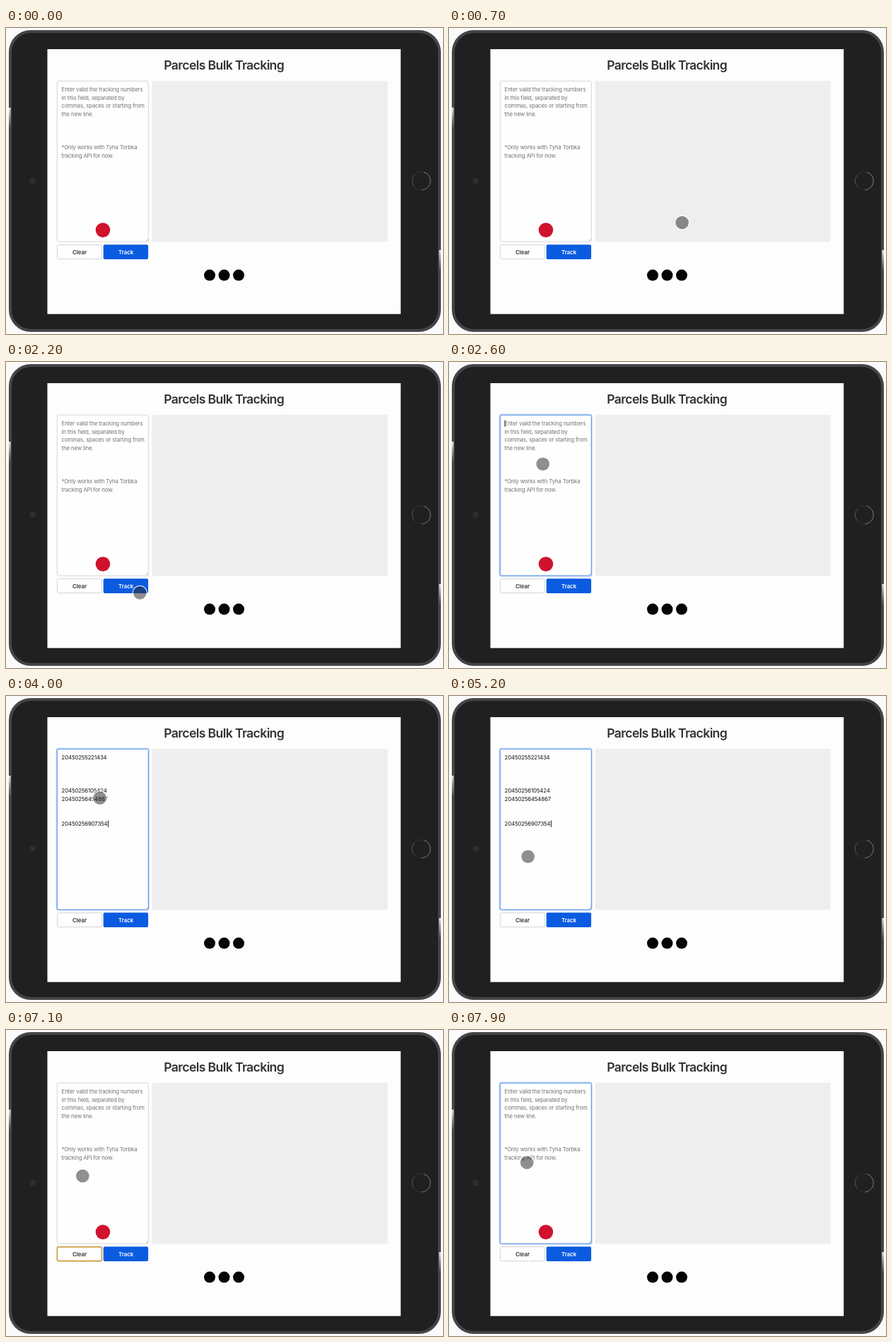
Animation of 618x434 px, one loop 8 s. Source, as an HTML page with a canvas:

```html
<!DOCTYPE html>
<html lang="en">
<head>
<meta charset="utf-8">
<title>Parcels Bulk Tracking</title>
<style>
  html, body { margin: 0; width: 100%; height: 100%; overflow: hidden; background: #fafafa; }
  canvas, svg { position: absolute; left: 0; top: 0; width: 618px; height: 434px; }
  text { font: 400 7.83px Inter, sans-serif; letter-spacing: -0.02em; }
  .title { font-size: 17.6px; font-weight: 600; letter-spacing: -0.035em; fill: #333; text-anchor: middle; }
  .button { font-weight: 600; text-anchor: middle; letter-spacing: 0; }
  #hint { fill: #747474; }
  #numbers { fill: #111; }
</style>
</head>
<body>
<canvas width="618" height="434"></canvas>
<svg viewBox="0 0 618 434">
  <text class="title" x="308.2" y="59.3">Parcels Bulk Tracking</text>
  <g id="hint"></g>
  <g id="numbers"></g>
  <text class="button" x="104" y="320.6" fill="#333">Clear</text>
  <text class="button" x="169.6" y="320.6" fill="#fff">Track</text>
  <rect id="caret" y="82.5" width="0.9" height="9.5" fill="#111"/>
  <g id="pointer">
    <circle r="9.9" fill="none" stroke="#fff" stroke-opacity=".85" stroke-width="1.3"/>
    <circle r="9.3" fill="rgb(40,40,40)" fill-opacity=".52"/>
  </g>
</svg>
<script>
const LOOP = 8000, STEP = 100;
const LINE = 11.75, FIRST = 89.9;
const FOCUS = 2600, PASTE = 4000, CLEAR = 6100, REFOCUS = 7400;

const canvas = document.querySelector('canvas');
const ctx = canvas.getContext('2d');
const scale = window.devicePixelRatio || 1;
canvas.width = 618 * scale;
canvas.height = 434 * scale;

const byId = id => document.getElementById(id);
const hint = byId('hint'), numbers = byId('numbers');
const caret = byId('caret'), pointer = byId('pointer');

// Each entry: line index, text
function addLines(group, lines) {
  for (const [row, words] of lines) {
    const el = document.createElementNS(group.namespaceURI, 'text');
    el.setAttribute('x', 78.6);
    el.setAttribute('y', FIRST + row * LINE);
    el.textContent = words;
    group.append(el);
  }
}
addLines(hint, [
  [0, 'Enter valid the tracking numbers'],
  [1, 'in this field, separated by'],
  [2, 'commas, spaces or starting from'],
  [3, 'the new line.'],
  [7, '*Only works with Tyha Torbka'],
  [8, 'tracking API for now.']
]);
addLines(numbers, [
  [0, '20450255221434'],
  [4, '20450256105424'],
  [5, '20450256454867'],
  [8, '20450256907354']
]);

// Pointer path: time, x, y
const path = [
  [100, 359, 394], [300, 350, 340], [500, 335, 292], [800, 327, 268],
  [1800, 327, 268], [2000, 268, 320], [2150, 214, 346], [2300, 140, 290],
  [2450, 94, 198], [2600, 132.7, 144.7],
  [4900, 132.7, 144.7], [5000, 129, 160], [5200, 111.7, 227.7], [5400, 104, 265],
  [5700, 99.5, 327], [5800, 100, 324], [6000, 100.5, 320.3],
  [7000, 100.5, 320.3], [7100, 108.3, 207], [7200, 110.2, 188], [LOOP, 110.2, 188]
];

function pointerAt(t) {
  const i = Math.max(1, path.findIndex(p => p[0] > t));
  const [t0, x0, y0] = path[i - 1], [t1, x1, y1] = path[i];
  const k = (t - t0) / (t1 - t0);
  return [x0 + (x1 - x0) * k, y0 + (y1 - y0) * k];
}

function box(x, y, w, h, r, fill, stroke, width = 1) {
  ctx.beginPath();
  ctx.roundRect(x, y, w, h, r);
  if (fill) { ctx.fillStyle = fill; ctx.fill(); }
  if (stroke) { ctx.strokeStyle = stroke; ctx.lineWidth = width; ctx.stroke(); }
}

function disc(x, y, r, fill) {
  ctx.beginPath();
  ctx.arc(x, y, r, 0, Math.PI * 2);
  ctx.fillStyle = fill;
  ctx.fill();
}

function arc(x, y, r, from, to, color, width) {
  ctx.beginPath();
  ctx.arc(x, y, r, from, to);
  ctx.strokeStyle = color;
  ctx.lineWidth = width;
  ctx.stroke();
}

function glint(x, y, h) {
  const g = ctx.createLinearGradient(0, y, 0, y + h);
  g.addColorStop(0, '#e8e8e8');
  g.addColorStop(0.35, '#a5a5a8');
  g.addColorStop(1, '#444446');
  ctx.fillStyle = g;
  ctx.fillRect(x, y, 2.6, h);
}

function drawTablet() {
  ctx.fillStyle = '#fafafa';
  ctx.fillRect(0, 0, 618, 434);
  box(4, 3, 611, 428, 31, '#454547');
  glint(4, 113, 30);
  glint(612.4, 315, 30);
  box(8, 7, 603, 420, 27, '#202021');

  disc(37.7, 216.7, 4, '#39393a');
  disc(37.7, 216.7, 2.8, '#222223');
  disc(37.7, 216.7, 1.4, '#3d3d3f');

  arc(587.3, 216.8, 13, 0, Math.PI * 2, '#303031', 1);
  arc(587.3, 216.8, 13, -1.3, 1.5, '#77777a', 1);
  arc(587.3, 216.8, 13, 2.5, 3.9, '#505052', 1);
  ctx.fillStyle = '#fdfdfd';
  ctx.fillRect(58.5, 30, 499.7, 375.7);
}

function drawPage(focused, clearActive, empty) {
  box(206.7, 75, 333, 228.3, 2, '#eeeeee');

  if (focused) box(71.8, 74.8, 129.8, 228.4, 2.5, null, 'rgba(70,135,230,.3)', 2.6);
  box(72.3, 75.2, 129, 227.8, 2, '#fefefe', focused ? '#4e8fe6' : '#d6d6d6');
  ctx.beginPath();
  ctx.moveTo(198, 302); ctx.lineTo(200.7, 299.3);
  ctx.moveTo(199.8, 302); ctx.lineTo(200.7, 301);
  ctx.strokeStyle = '#888';
  ctx.lineWidth = 0.6;
  ctx.stroke();
  if (empty) disc(137, 286.6, 10.3, '#d0122d');

  box(72.4, 307.6, 63, 20, 2, '#fefefe', clearActive ? '#cb9a3c' : '#d4d4d4', clearActive ? 1.6 : 1);
  box(137.7, 307.2, 63.4, 20.8, 2, '#0b5be1');
  for (const x of [288, 308.5, 329]) disc(x, 350.6, 8, '#050505');
}

const show = (el, on) => { el.style.display = on ? '' : 'none'; };

function render(t) {
  const focused = (t >= FOCUS && t < CLEAR) || t >= REFOCUS;
  const filled = t >= PASTE && t < CLEAR;
  const clearActive = t >= CLEAR && t < REFOCUS;

  ctx.setTransform(scale, 0, 0, scale, 0, 0);
  drawTablet();
  drawPage(focused, clearActive, !filled);

  show(hint, !filled);
  show(numbers, filled);

  const blinkStart = t >= REFOCUS ? REFOCUS : filled ? PASTE : FOCUS;
  show(caret, focused && Math.floor((t - blinkStart) / 500) % 2 === 0);
  caret.setAttribute('x', filled ? 144 : 78.6);
  caret.setAttribute('y', 82.5 + (filled ? 8 * LINE : 0));

  show(pointer, t >= 100);
  if (t >= 100) pointer.setAttribute('transform', `translate(${pointerAt(t)})`);
}

function tick() {
  const t = performance.now() % LOOP;
  render(Math.floor(t / STEP) * STEP);
  requestAnimationFrame(tick);
}
tick();
</script>
</body>
</html>
```
